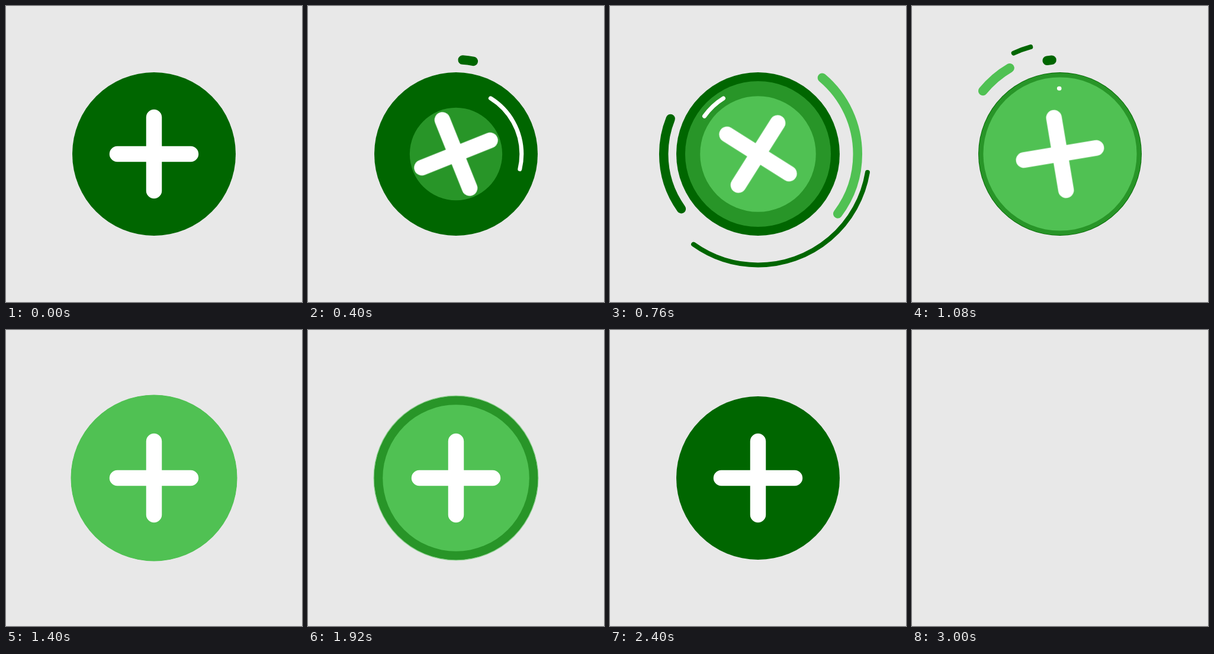
Write an HTML page without scripts that moves like this. It is 500 px wide and 500 px high and loops after 3.04 s.

```html
<!DOCTYPE html>
<html lang="en">
<head>
<meta charset="utf-8">
<title>Plus button</title>
<style>
  @property --head { syntax: '<length>'; inherits: false; initial-value: 0px; }
  @property --tail { syntax: '<length>'; inherits: false; initial-value: 400px; }

  :root { --dark: #006600; --mid: #289528; --light: #50c153; --loop: 3040ms linear infinite; }
  html, body { margin: 0; width: 100%; height: 100%; overflow: hidden; background: #e8e8e8; }
  svg { display: block; width: 100vw; height: 100vh; }

  .stage { animation: blink var(--loop); }
  .plus { fill: none; stroke: #fff; stroke-width: 26.5; stroke-linecap: round; animation: spin var(--loop); }
  .base { fill: var(--dark); }
  .rim { fill: none; stroke: var(--light); stroke-width: 1.5; opacity: 0; animation: rim var(--loop); }
  .mid { fill: var(--mid); r: 0px; animation: mid var(--loop); }
  .light { fill: var(--light); r: 0px; animation: light var(--loop); }

  /* Each arc covers the degrees from tail to head, clockwise from the top. */
  .arc {
    fill: none;
    stroke-linecap: round;
    stroke-dasharray: max(0px, var(--head) - var(--tail)) 720px;
    stroke-dashoffset: calc(-1 * var(--tail));
  }
  .shine { stroke: #fff; stroke-width: 7; animation: shine-head var(--loop), shine-tail var(--loop); }
  .inner { stroke: var(--dark); stroke-width: 15.5; animation: inner-head var(--loop), inner-tail var(--loop); }
  .middle { stroke: var(--light); stroke-width: 15.5; animation: middle-head var(--loop), middle-tail var(--loop); }
  .outer { stroke: var(--dark); stroke-width: 8; animation: outer-head var(--loop), outer-tail var(--loop); }

  @keyframes blink {
    0%, 98.67% { opacity: 1; }
    98.68%, 100% { opacity: 0; }
  }
  @keyframes spin {
    0% { transform: rotate(0deg); }
    7.895% { transform: rotate(0deg); animation-timing-function: cubic-bezier(.283, 0, .759, 1); }
    46.053%, 100% { transform: rotate(-360deg); }
  }
  @keyframes rim {
    0%, 57.2% { opacity: 0; }
    57.3%, 64.4% { opacity: .6; }
    64.5%, 100% { opacity: 0; }
  }
  @keyframes mid {
    0% { r: 0px; }
    6.579% { r: 0px; animation-timing-function: cubic-bezier(.132, 1, .764, 1); }
    46.053% { r: 140px; }
    61.184% { r: 140px; animation-timing-function: cubic-bezier(.5, 0, .55, 1); }
    82.566%, 100% { r: 0px; }
  }
  @keyframes light {
    0% { r: 0px; }
    13.158% { r: 0px; animation-timing-function: cubic-bezier(.256, 1, .979, 1); }
    46.053% { r: 140.5px; }
    57.237% { r: 140.5px; animation-timing-function: cubic-bezier(.5, 0, .6, 1); }
    78.947%, 100% { r: 0px; }
  }

  /* A tail of 400px parks the arc past the end of its path. */
  @keyframes shine-head {
    0% { --head: 0px; }
    6.579% { --head: 0px; animation-timing-function: cubic-bezier(.345, 0, .072, 1); }
    37.368%, 100% { --head: 360px; }
  }
  @keyframes shine-tail {
    0%, 6.57% { --tail: 400px; }
    6.579% { --tail: 0px; animation-timing-function: cubic-bezier(.514, 0, .234, 1); }
    37.5% { --tail: 360px; }
    37.51%, 100% { --tail: 400px; }
  }
  @keyframes inner-head {
    0% { --head: 0px; }
    7.895% { --head: 0px; animation-timing-function: cubic-bezier(.625, 0, .071, 1); }
    41.382%, 100% { --head: 360px; }
  }
  @keyframes inner-tail {
    0%, 7.89% { --tail: 400px; }
    7.895% { --tail: 0px; animation-timing-function: cubic-bezier(.904, 0, .016, 1); }
    43.322% { --tail: 360px; }
    43.33%, 100% { --tail: 400px; }
  }
  @keyframes middle-head {
    0% { --head: 0px; }
    15.789% { --head: 0px; animation-timing-function: cubic-bezier(.427, 0, .221, 1); }
    45.395%, 100% { --head: 360px; }
  }
  @keyframes middle-tail {
    0%, 15.78% { --tail: 400px; }
    15.789% { --tail: 0px; animation-timing-function: cubic-bezier(.682, 0, .292, 1); }
    46.04% { --tail: 360px; }
    46.05%, 100% { --tail: 400px; }
  }
  @keyframes outer-head {
    0% { --head: 0px; }
    13.2% { --head: 0px; animation-timing-function: cubic-bezier(.362, 0, .247, 1); }
    42.763%, 100% { --head: 360px; }
  }
  @keyframes outer-tail {
    0%, 13.19% { --tail: 400px; }
    13.2% { --tail: 0px; animation-timing-function: cubic-bezier(.621, 0, .317, 1); }
    43.41% { --tail: 360px; }
    43.42%, 100% { --tail: 400px; }
  }
</style>
</head>
<body>
<svg viewBox="0 0 500 500">
  <g class="stage">
    <g transform="translate(250 250)">
      <circle class="rim" r="138.8"/>
      <circle class="base" r="138"/>
      <circle class="mid"/>
      <circle class="light"/>
      <g transform="rotate(-90)">
        <circle class="arc outer" r="187.5" pathLength="360"/>
        <circle class="arc middle" r="168.3" pathLength="360"/>
        <circle class="arc inner" r="159.3" pathLength="360"/>
        <circle class="arc shine" r="110.8" pathLength="360"/>
      </g>
      <path class="plus" d="M0-62V62M-62 0H62"/>
    </g>
  </g>
</svg>
</body>
</html>
```
